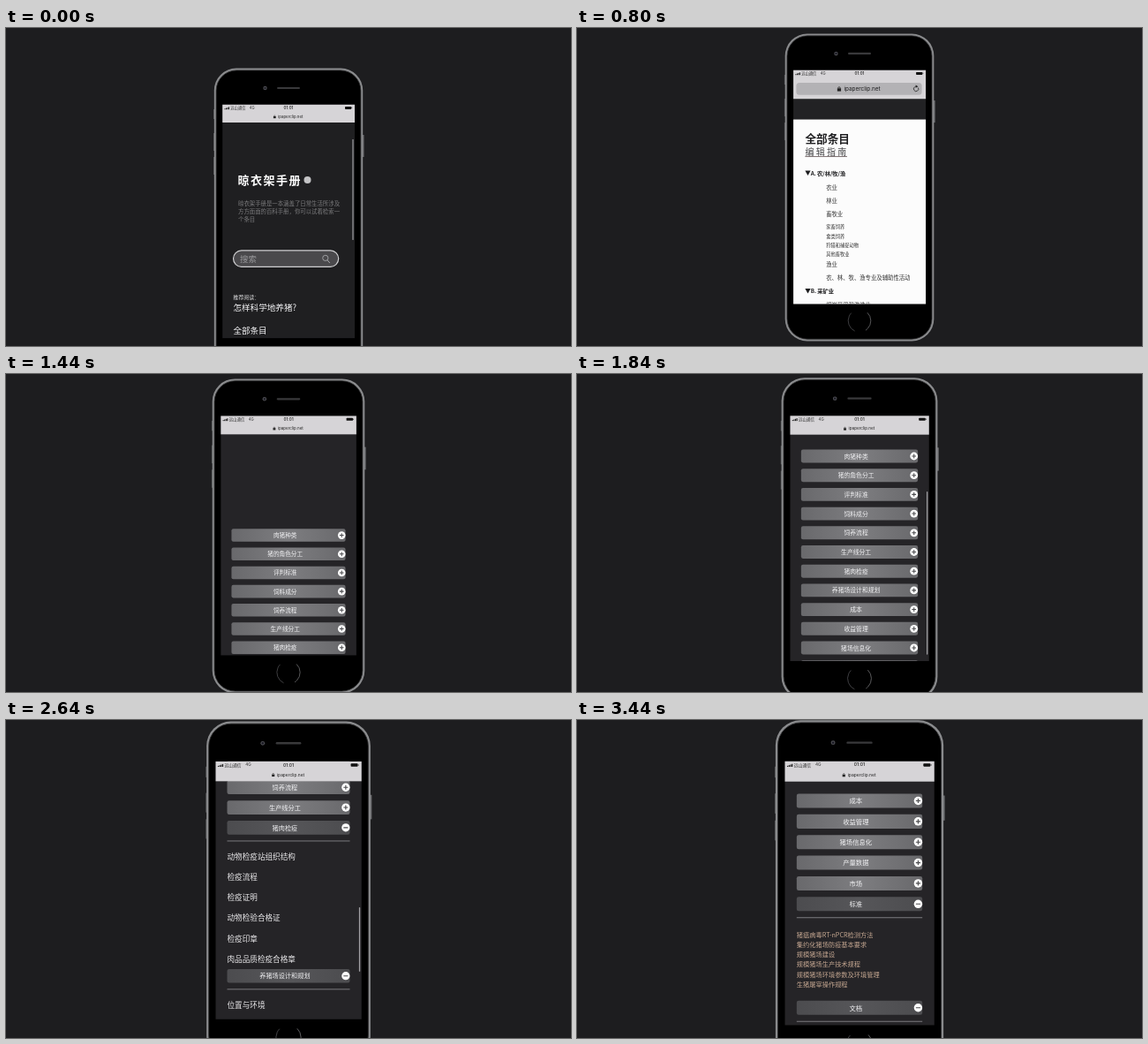
Write an HTML page with a canvas that moves like this. It is 640x360 px and loops after 3.52 s.

```html
<!DOCTYPE html>
<html lang="zh-CN">
<head>
<meta charset="utf-8">
<style>
html, body { margin: 0; width: 100%; height: 100%; overflow: hidden; background: #1d1d1f; }
canvas { display: block; width: 640px; height: 360px; }
</style>
</head>
<body>
<canvas id="stage" width="640" height="360"></canvas>
<script>
const ctx = document.getElementById('stage').getContext('2d');
const LOOP = 3520, STEP = 80;
const SANS = '"Noto Sans CJK SC", "Noto Sans CJK", "Noto Sans", sans-serif';
const LATIN = 'Inter, "Liberation Sans", sans-serif';
const PITCH = 20.67;
const INDEX_AT = 800, TOPICS_AT = 1360;

const clamp = v => Math.max(0, Math.min(1, v));
const ramp = (t, a, b) => clamp((t - a) / (b - a));
const smooth = u => u * u * (3 - 2 * u);
const mix = (a, b, u) => a + (b - a) * u;

function box(x, y, w, h, fill) {
  ctx.fillStyle = fill;
  ctx.fillRect(x, y, w, h);
}

function pill(x, y, w, h, r, fill, stroke, lw) {
  ctx.beginPath();
  ctx.roundRect(x, y, w, h, r);
  if (fill) { ctx.fillStyle = fill; ctx.fill(); }
  if (stroke) { ctx.strokeStyle = stroke; ctx.lineWidth = lw; ctx.stroke(); }
}

function disc(x, y, r, fill) {
  ctx.beginPath();
  ctx.arc(x, y, r, 0, 7);
  ctx.fillStyle = fill;
  ctx.fill();
}

function arc(x, y, r, a, b, color, lw) {
  ctx.beginPath();
  ctx.arc(x, y, r, a, b);
  ctx.strokeStyle = color;
  ctx.lineWidth = lw;
  ctx.stroke();
}

function line(x1, y1, x2, y2, color, lw) {
  ctx.beginPath();
  ctx.moveTo(x1, y1);
  ctx.lineTo(x2, y2);
  ctx.strokeStyle = color;
  ctx.lineWidth = lw;
  ctx.stroke();
}

function text(s, x, y, size, color, { weight = 400, align = 'left', font = SANS, gap = 0 } = {}) {
  ctx.font = `${weight} ${size}px ${font}`;
  ctx.letterSpacing = gap + 'px';
  ctx.textAlign = align;
  ctx.textBaseline = 'middle';
  ctx.fillStyle = color;
  ctx.fillText(s, x, y);
}

function lock(x, y, k) {
  box(x - 1.4 * k, y - 0.3 * k, 2.8 * k, 2.2 * k, '#222');
  arc(x, y - 0.4 * k, 0.9 * k, Math.PI, 0, '#222', 0.5 * k);
}

function drawBody() {
  for (const [y, h] of [[53, 11], [80, 20], [107, 20]]) box(235, y, 1.5, h, '#58595b');
  box(403.6, 82, 1.9, 25, '#6c6d70');
  pill(235.8, 6.6, 168.4, 347.4, 25, '#8b8c8e');
  pill(238.1, 8.9, 163.8, 342.8, 23, '#000', '#303032', 0.8);
  pill(307, 27.9, 26, 2.2, 1.1, '#39393b');
  disc(293.5, 29, 2.2, '#4b4b50');
  disc(293.5, 29, 1.1, '#161620');
  arc(320, 331, 12.8, -0.8, 1, '#6c6c6f', 0.8);
  arc(320, 331, 12.8, 2, 3.9, '#4c4c4f', 0.8);
}

function drawBar(wide) {
  box(244.5, 47.5, 151, wide ? 32.7 : 20.5, '#d6d4d7');
  for (let i = 0; i < 4; i++) box(247.4 + i * 1.5, 52.2 - i * 0.6, 1.1, 1 + i * 0.6, '#222');
  text('远山通信', 254.3, 51.4, 4.3, '#333');
  text('4G', 275.8, 51.4, 4.2, '#333', { font: LATIN });
  text('01:01', 320, 51.4, 4.5, '#222', { font: LATIN, align: 'center', weight: 500 });
  pill(384, 49.9, 7.2, 3, 0.7, '#111');
  box(391.5, 50.8, 0.6, 1.2, '#111');
  if (wide) {
    pill(248.5, 62, 142, 13.8, 3.5, '#b3b2b5');
    lock(297, 68.7, 1.5);
    text('ipaperclip.net', 323, 68.8, 6.4, '#1c1c1e', { font: LATIN, align: 'center' });
    arc(384, 68.9, 2.7, -0.5, 4.6, '#222', 0.8);
    ctx.fillStyle = '#222';
    ctx.beginPath();
    ctx.moveTo(383.6, 64.6);
    ctx.lineTo(386.3, 66.2);
    ctx.lineTo(383.6, 67.8);
    ctx.fill();
  } else {
    lock(304.3, 61.3, 1);
    text('ipaperclip.net', 322.3, 61.5, 4.4, '#222', { font: LATIN, align: 'center' });
  }
}

function thumb(top, len, alpha) {
  if (alpha <= 0) return;
  ctx.globalAlpha = alpha;
  pill(392.4, top, 1.2, len, 0.6, '#a2a1a5');
  ctx.globalAlpha = 1;
}

function drawHome(t) {
  box(244.5, 47.5, 151, 265, '#1f1f21');
  text('晾衣架手册', 262.5, 133, 13, '#fff', { weight: 900, gap: 1.5 });
  disc(341.5, 133, 4, '#c4c4c6');
  ['晾衣架手册是一本涵盖了日常生活所涉及', '方方面面的百科手册，你可以试着检索一', '个条目']
    .forEach((s, i) => text(s, 263, 159.5 + i * 8.9, 6.4, '#7b7b7d'));
  pill(257.5, 212.9, 119.2, 18.4, 9.2, '#4a494c', '#d0d0d2', 1.2);
  text('搜索', 265, 222.4, 9.4, '#98989b');
  arc(361.8, 221.4, 3.1, 0, 7, '#a8a8ab', 0.9);
  line(364, 223.8, 366.8, 227, '#a8a8ab', 1);
  text('推荐阅读：', 257.3, 265.7, 6, '#e0e0e2', { weight: 500 });
  text('怎样科学地养猪?', 257.4, 277.8, 9.6, '#f4f4f6');
  text('全部条目', 257.4, 303.8, 9.5, '#f4f4f6');
  thumb(87, 114, 1 - ramp(t, 80, 400));
}

function section(s, y) {
  ctx.fillStyle = '#1c1c1e';
  ctx.beginPath();
  ctx.moveTo(258.5, y - 2.6);
  ctx.lineTo(264.7, y - 2.6);
  ctx.lineTo(261.6, y + 2.8);
  ctx.fill();
  text(s, 264.8, y, 6.2, '#1c1c1e', { weight: 600 });
}

function drawIndex() {
  box(244.5, 47.5, 151, 265, '#222224');
  box(244.5, 103.5, 151, 209, '#fcfcfc');
  text('全部条目', 258.5, 125.3, 12.6, '#202022', { weight: 700 });
  text('编 辑 指 南', 258.5, 140.4, 10, '#444446');
  line(258.5, 145.4, 306, 145.4, '#49393a', 0.7);
  section('A. 农/林/牧/渔', 164);
  ['农业', '林业', '畜牧业'].forEach((s, i) => text(s, 282.2, 180.7 + i * 15, 6.35, '#333'));
  ['家畜饲养', '禽类饲养', '狩猎和捕捉动物', '其他畜牧业']
    .forEach((s, i) => text(s, 282.2, 225.2 + i * 10.2, 5.25, '#333'));
  text('渔业', 282.2, 266.8, 6.35, '#333');
  text('农、林、牧、渔专业及辅助性活动', 282.2, 282.2, 6.35, '#333');
  section('B. 采矿业', 297.3);
  text('煤炭开采和洗选业', 282.2, 312.8, 6.35, '#333');
}

const TOPICS = ['肉猪种类', '猪的角色分工', '评判标准', '饲料成分', '饲养流程', '生产线分工',
  '猪肉检疫', '养猪场设计和规划', '成本', '收益管理', '猪场信息化', '产量数据', '市场', '标准', '文档'];

// Folding sections: opening time, full height, row placement and style.
const FOLDS = {
  6: { at: 2000, height: 152.2, first: 29.7, gap: 21, size: 7.8, color: '#e9e8ea',
    rows: ['动物检疫站组织结构', '检疫流程', '检疫证明', '动物检验合格证', '检疫印章', '肉品品质检疫合格章'] },
  7: { at: 2080, height: 139.9, first: 30, gap: 21.45, size: 7.8, color: '#e9e8ea',
    rows: ['位置与环境', '投资与评估', '规模与功能', '风格与形式', '组织结构'] },
  13: { at: 3200, height: 104, first: 30.6, gap: 9.95, size: 6.4, color: '#c5a791',
    rows: ['猪瘟病毒RT-nPCR检测方法', '集约化猪场防疫基本要求', '规模猪场建设', '规模猪场生产技术规程',
      '规模猪场环境参数及环境管理', '生猪屠宰操作规程'] },
  14: { at: 3280, height: 60, first: 30, gap: 10, size: 6.4, color: '#c5a791', rows: [] }
};

function topic(s, y, open) {
  const g = ctx.createLinearGradient(257, 0, 383, 0);
  const edge = Math.round(mix(105, 76, open)), mid = Math.round(mix(125, 86, open));
  g.addColorStop(0, `rgb(${edge},${edge},${edge + 3})`);
  g.addColorStop(0.5, `rgb(${mid},${mid},${mid + 3})`);
  g.addColorStop(1, `rgb(${edge},${edge},${edge + 3})`);
  pill(257, y - 7.1, 126, 14.2, 2, g);
  text(s, 316.3, y, 6.5, '#f3f3f5', { align: 'center' });
  disc(378.8, y, 4.2, '#fff');
  line(376.5, y, 381.1, y, '#4a4a4d', 1);
  if (open < 0.5) line(378.8, y - 2.3, 378.8, y + 2.3, '#4a4a4d', 1);
}

function drawTopics(t) {
  box(244.5, 47.5, 151, 265, '#252427');
  // Two flicks of the page.
  const top = 179.5 - 176.6 * smooth(ramp(t, 1600, 2080)) - 331.7 * smooth(ramp(t, 2560, 3282));
  let y = top;
  TOPICS.forEach((name, i) => {
    const fold = FOLDS[i];
    const open = fold ? smooth(ramp(t, fold.at, fold.at + 160)) : 0;
    topic(name, y, open);
    if (open > 0) {
      ctx.globalAlpha = open;
      line(257, y + 13.7, 383, y + 13.7, '#87868a', 0.8);
      fold.rows.forEach((s, k) => text(s, 257, y + (fold.first + k * fold.gap) * open, fold.size, fold.color));
      ctx.globalAlpha = 1;
    }
    y += mix(PITCH, fold ? fold.height : PITCH, open);
  });
  if (t < 2240) thumb(129.3 - (top - 91.2) * 0.6, 176, ramp(t, 1520, 1680) * (1 - ramp(t, 2000, 2240)));
  else thumb(246.3 - (top + 189.5) * 0.27, 66, ramp(t, 2480, 2640) * (1 - ramp(t, 3200, 3400)));
}

function draw(t) {
  ctx.setTransform(1, 0, 0, 1, 0, 0);
  box(0, 0, 640, 360, '#1d1d1f');
  const rise = 39 * (1 - ramp(t, 0, 480)) ** 2;
  const zoom = t < 720 ? 1 : 1 + 0.13 * (1 - Math.cos(Math.PI * ramp(t, 600, LOOP))) / 2;
  ctx.translate(320, 55 + rise);
  ctx.scale(zoom, zoom);
  ctx.translate(-320, -55);
  drawBody();
  ctx.save();
  ctx.beginPath();
  ctx.rect(245.2, 47.5, 149.8, 264.7);
  ctx.clip();
  const index = t >= INDEX_AT && t < TOPICS_AT;
  if (t < INDEX_AT) drawHome(t);
  else if (index) drawIndex();
  else drawTopics(t);
  drawBar(index);
  ctx.restore();
}

const start = performance.now();
function tick() {
  const t = (performance.now() - start) % LOOP;
  draw(Math.floor(t / STEP) * STEP);
  requestAnimationFrame(tick);
}
tick();
</script>
</body>
</html>
```
